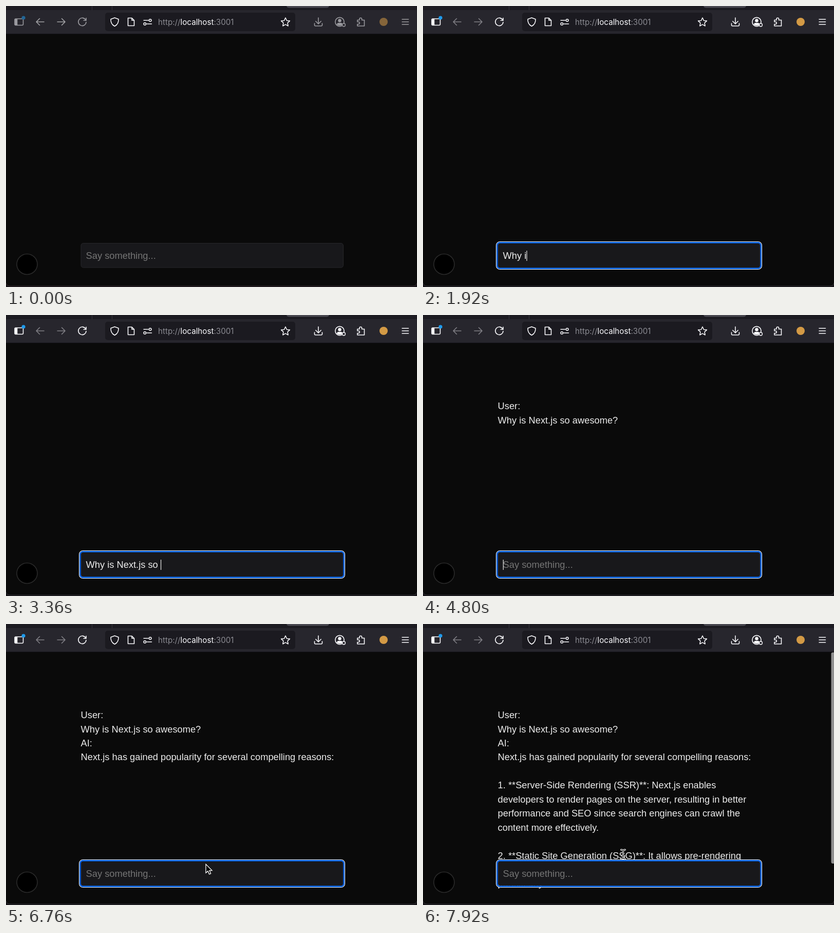
Write an HTML page that moves like this. It is 800x549 px and loops after 8 s.

```html
<!DOCTYPE html>
<html lang="en">
<head>
<meta charset="utf-8">
<title>Chat</title>
<style>
html, body { margin: 0; height: 100%; overflow: hidden; background: #0a0a0a; }
svg { display: block; }
text { font: 18.29px "Liberation Sans", Arial, sans-serif; fill: #ededed; white-space: pre; }
.url { font: 15.2px Inter, sans-serif; fill: #8b8b92; }
.url .host { fill: #fbfbfe; }
.line { fill: none; stroke: #fbfbfe; stroke-width: 1.6; stroke-linecap: round; stroke-linejoin: round; }
</style>
</head>
<body>
<svg width="800" height="549" viewBox="0 0 800 549">
  <rect width="800" height="549" fill="#0a0a0a"/>

  <!-- browser chrome -->
  <rect width="800" height="54" fill="#27262d"/>
  <rect width="800" height="8" fill="#1c1b21"/>
  <path d="M167.5 0V8M206.5 0V8" stroke="#37363d"/>
  <path d="M546 0H629Q628 3.5 624 3.5H551Q547 3.5 546 0Z" fill="#4b4a52"/>
  <path d="M0 54.5H800" stroke="#141318"/>
  <rect x="193" y="13" width="370" height="36" rx="5" fill="#1b1a20"/>

  <g id="tools" class="line">
    <rect x="17" y="25" width="16.5" height="12.5" rx="2"/>
    <path d="M18 26H21.5V37H18Z" fill="#fbfbfe"/>
    <circle cx="34" cy="23" r="3.6" fill="#1e9bec" stroke="none"/>
    <path d="M155.2 27.5A7.6 7.6 0 1 0 156 31.5M156 23.5V28.2H151.2"/>
    <path d="M608 23V34.5M602.8 29.8L608 35L613.2 29.8M600.5 34V37Q600.5 39 602.5 39H613.5Q615.5 39 615.5 37V34"/>
    <circle cx="649.5" cy="31" r="8.6"/>
    <circle cx="649.5" cy="28.5" r="3.2" fill="#fbfbfe" stroke="none"/>
    <path d="M644 36.5Q644 33 647 33H652Q655 33 655 36.5Q649.5 40 644 36.5Z" fill="#fbfbfe" stroke="none"/>
    <circle cx="657.5" cy="37" r="3" fill="#27262d" stroke-width="1.3"/>
    <path d="M684 27.5H688V25.5A2.2 2.2 0 0 1 692.6 25.5V27.5H697.5V39H684V35.5H686A2.2 2.2 0 0 0 686 31H684Z"/>
    <circle cx="735" cy="31" r="8" fill="#d39a45" stroke="none"/>
    <path d="M771 26H783.5M771 31H783.5M771 36H783.5" stroke-width="1.5"/>
  </g>
  <g id="arrows" class="line">
    <path d="M74 31H59M65.5 24.5L59 31L65.5 37.5M100 31H115M108.5 24.5L115 31L108.5 37.5"/>
  </g>
  <g class="line">
    <path d="M211.5 23L219 25.8Q219.5 35.5 211.5 39.5Q203.5 35.5 204 25.8Z"/>
    <path d="M237.5 23.5H245L249.5 28V38.5H237.5ZM245 23.5V28H249.5"/>
    <path d="M268 28H277M274 35H283.5" stroke-width="1.5"/>
    <circle cx="280.7" cy="28" r="2.3" stroke-width="1.5"/>
    <circle cx="270.3" cy="35" r="2.3" stroke-width="1.5"/>
    <path d="M544 23L546.5 28.4L552.4 29.1L548 33.1L549.2 39L544 36.1L538.8 39L540 33.1L535.6 29.1L541.5 28.4Z" stroke-width="1.5"/>
  </g>
  <text class="url" x="296" y="37">http://<tspan class="host">localhost</tspan>:3001</text>

  <!-- page -->
  <g id="chat"></g>
  <circle cx="41" cy="504.5" r="20" fill="#000" stroke="#2a2a2a" stroke-width="1.6"/>
  <rect x="146" y="463.5" width="510.5" height="47.5" rx="4.5" fill="#18181b" stroke="#27272a"/>
  <g id="ring" fill="none">
    <rect x="142.6" y="460.6" width="516.8" height="53.8" rx="7" stroke="#f4f6fa" stroke-width="1.3"/>
    <rect x="144.4" y="462.4" width="513.2" height="50.2" rx="5.5" stroke="#0560e0" stroke-width="2.6"/>
  </g>
  <text id="field" x="155.6" y="493.8"></text>
  <rect id="caret" y="478" width="1.2" height="20" fill="#ededed"/>
  <rect id="thumb" x="794.5" y="55.5" width="9" rx="3" fill="#8f8f8f"/>
  <path d="M0 541Q1 546.8 8 547.2H792Q799 546.8 800 541V549H0Z" fill="#141216"/>
  <path id="edge" d="M0 541Q1 546.8 8 547.2H792Q799 546.8 800 541" fill="none" stroke="#343338"/>

  <!-- pointers, hot spot at the origin -->
  <path id="arrow" d="M0 0V17L4 13.4L6.6 19.6L9.6 18.3L7 12.3H12Z" fill="#000" stroke="#fff" stroke-width="1.3"/>
  <g id="beam" fill="none" stroke-linecap="round">
    <path id="beamShape" d="M-4 -9Q0 -9 0 -6Q0 -9 4 -9M0 -6V6M-4 9Q0 9 0 6Q0 9 4 9M-2.5 3H2.5" stroke="#fff" stroke-width="3"/>
    <path d="M-4 -9Q0 -9 0 -6Q0 -9 4 -9M0 -6V6M-4 9Q0 9 0 6Q0 9 4 9M-2.5 3H2.5" stroke="#111" stroke-width="1.2"/>
  </g>
</svg>
<script>
const LOOP = 8000, LINE = 27.43;
const FOCUS = 120, SUBMIT = 4640, REPLY = 6480, MID = 7240, END = 7920, BLINK = 567;
const question = "Why is Next.js so awesome?";
const keyTimes = [1600, 1680, 1760, 1840, 1920, 2000, 2120, 2280, 2440, 2600, 2760, 2840, 2920,
  3000, 3080, 3160, 3240, 3320, 3520, 3680, 3760, 3840, 4080, 4160, 4240, 4320];
const reply = `Next.js has gained popularity for several compelling reasons:

1. **Server-Side Rendering (SSR)**: Next.js enables
developers to render pages on the server, resulting in better
performance and SEO since search engines can crawl the
content more effectively.

2. **Static Site Generation (SSG)**: It allows pre-rendering
of pages at build time, which makes sites load faster and is
particularly`;
const midLength = reply.indexOf("resulting") + "resulting".length;

const el = id => document.getElementById(id);
const show = (id, on) => el(id).setAttribute("visibility", on ? "visible" : "hidden");
const put = (id, x, y) => el(id).setAttribute("transform", `translate(${x} ${y})`);
const ramp = (t, a, b) => Math.min(1, Math.max(0, (t - a) / (b - a)));

// Reply so far, cut back to whole words
function streamed(t) {
  const n = Math.floor(midLength * ramp(t, REPLY, MID) +
    (reply.length - midLength) * ramp(t, MID, END) + 0.01);
  const part = reply.slice(0, n);
  return n >= reply.length || /\s/.test(reply[n]) ? part : part.replace(/\S+$/, "");
}

function drawChat(t) {
  const lines = t < SUBMIT ? [] : ["User:", question];
  if (t >= REPLY) lines.push("AI:", ...streamed(t).split("\n"));
  el("chat").replaceChildren(...lines.map((line, i) => {
    const row = document.createElementNS("http://www.w3.org/2000/svg", "text");
    row.setAttribute("x", 145.6);
    row.setAttribute("y", 184.2 + i * LINE);
    row.textContent = line;
    return row;
  }));
  const height = 218.3 + lines.length * LINE;
  show("thumb", height > 494);
  el("thumb").setAttribute("height", 480 * 494 / height);
}

function drawField(t) {
  const typed = t < SUBMIT ? question.slice(0, keyTimes.filter(k => k <= t).length) : "";
  const field = el("field");
  field.textContent = typed || "Say something...";
  field.style.fill = typed ? "#ededed" : "#757575";
  const width = typed ? field.getComputedTextLength() : 0;
  el("caret").setAttribute("x", 155.7 + width);
  const blinkOn = t < SUBMIT || Math.floor((t - SUBMIT + 74) / BLINK) % 2 === 0;
  show("caret", t >= FOCUS && blinkOn);
  show("ring", t >= FOCUS);
}

function drawPointer(t) {
  const y = 478 - 6 * ramp(t, 5960, 6160) - 7 * ramp(t, 6480, 7200) - 15 * ramp(t, 7320, 7560);
  const overText = y < 460;
  put("arrow", 389, y);
  put("beam", 389.5, y);
  show("arrow", t >= 5960 && !overText);
  show("beam", overText);
}

function draw(now) {
  const t = now % LOOP;
  const active = ramp(t, 40, 240);
  el("tools").setAttribute("opacity", 0.55 + 0.45 * active);
  el("arrows").setAttribute("opacity", 0.58 - 0.16 * active);
  el("edge").setAttribute("stroke", active ? "#343338" : "#3a2a30");
  drawChat(t);
  drawField(t);
  drawPointer(t);
  requestAnimationFrame(() => draw(performance.now()));
}
draw(performance.now());
</script>
</body>
</html>
```
